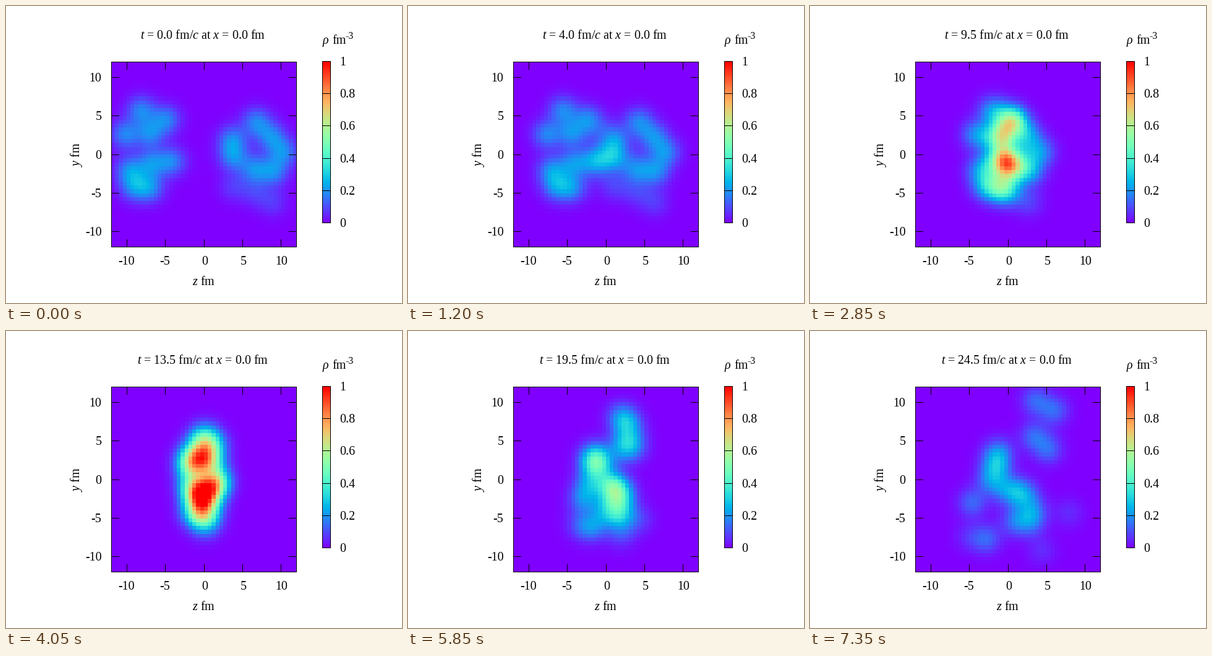
Write a matplotlib script that moves like this. It is 640 by 480 pixels and loops after 7.5 s.

```python
import numpy as np
import matplotlib as mpl
import matplotlib.pyplot as plt
from matplotlib.animation import FuncAnimation

mpl.rcParams.update({
    "font.family": "Liberation Serif",
    "mathtext.fontset": "custom",
    "mathtext.rm": "Liberation Serif",
    "mathtext.it": "Liberation Serif:italic",
})

FRAMES, STEP_MS, DT = 50, 150, 0.5
LEFT, RIGHT, TOP, BOTTOM = 170, 470, 90, 390
BAR_L, BAR_R, BAR_T, BAR_B = 511, 525, 89, 351
LIMIT, CELLS = 12, 48

SPEED = 0.64            # approach speed of each nucleus
STOPPING = 0.35         # share of the motion left after crossing z = 0
T_MAX, T_END = 13.5, 24.5
WIDTH, PEAK, LOSS, GAIN = 1.3, 0.17, 0.04, 1.2

# Start and end (z, y) of every cluster.
projectile = np.array([
    [(-8.1, 5.7), (3.6, 10.2)], [(-4.9, 4.5), (5.2, 3.9)],
    [(-7.0, 2.7), (3.4, 5.6)], [(-10.2, 2.6), (-1.2, 3.6)],
    [(-9.6, -2.0), (-4.6, -3.0)], [(-6.8, -1.2), (1.2, -1.6)],
    [(-4.2, -0.9), (2.2, -2.0)], [(-7.0, -4.3), (2.9, -5.5)],
    [(-9.0, -4.1), (-2.8, -7.7)],
])
target = np.array([
    [(6.8, 4.2), (6.0, 8.9)], [(3.7, 1.9), (-1.5, 2.4)],
    [(3.8, -0.3), (-2.3, -0.2)], [(8.7, 2.3), (-1.5, 1.2)],
    [(10.3, 0.3), (-0.3, -1.3)], [(9.0, -2.2), (3.2, -4.0)],
    [(6.5, -1.9), (0.9, -5.4)],
])
halo = np.array([
    [(3.8, -4.2), (-5.0, -7.4)], [(6.6, -4.9), (4.4, -9.2)],
    [(8.9, -6.2), (7.9, -4.3)],
])

centers = (np.arange(CELLS) + 0.5) * 2 * LIMIT / CELLS - LIMIT


def cloud(clusters, v, t):
    """Density of clusters that approach, pile up and then fly apart."""
    start, end = clusters[:, 0], clusters[:, 1]
    z = start[:, 0] + v * min(t, T_MAX)
    z = np.where(z * v > 0, STOPPING * z, z)
    u = max(0, (t - T_MAX) / (T_END - T_MAX))
    pos = (1 - u) * np.column_stack([z, start[:, 1]]) + u * end
    bell = np.exp(-(centers[:, None, None] - pos) ** 2 / (2 * WIDTH ** 2))
    return (PEAK - LOSS * u) * bell[..., 1] @ bell[..., 0].T


def density(t):
    a = cloud(projectile, SPEED, t)
    b = cloud(target, -SPEED, t) + 0.4 * cloud(halo, -SPEED, t)
    squeeze = GAIN * min(1, (T_END - t) / (T_END - T_MAX))
    return np.clip(a + b + squeeze * np.sqrt(a * b), 0, 1)


def rainbow(v):
    return np.stack([np.clip(np.abs(2 * v - 0.5), 0, 1),
                     np.clip(np.sin(np.pi * v), 0, 1),
                     np.clip(np.cos(np.pi * v / 2), 0, 1)], axis=-1)


fig = plt.figure(figsize=(6.4, 4.8), dpi=100, facecolor="white")
ax = fig.add_axes([0, 0, 1, 1])


def label(x, y, s, ha="center", size=20, **kw):
    return ax.text(x, y, s, ha=ha, va="baseline", fontsize=size * 0.72, **kw)


def line(xs, ys):
    ax.plot(xs, ys, color="black", lw=0.72, snap=False, zorder=3,
            solid_capstyle="butt", solid_joinstyle="miter")


def panel(data, l, r, t, b):
    """Image with a one pixel frame just inside its edges."""
    img = ax.imshow(data, extent=(l, r, b, t), origin="lower",
                    interpolation="nearest", aspect="auto")
    l, r, t, b = l + 0.5, r - 0.5, t + 0.5, b - 0.5
    line([l, r, r, l, l, r], [t, t, b, b, t, t])
    return img


def pixel(x):
    return np.floor(x) + 0.5


heat = panel(rainbow(density(0)), LEFT, RIGHT, TOP, BOTTOM)
panel(rainbow(np.linspace(0, 1, 128))[:, None, :], BAR_L, BAR_R, BAR_T, BAR_B)
ax.set_xlim(0, 640)
ax.set_ylim(480, 0)
ax.axis("off")

for v in range(-10, 11, 5):
    px = pixel(320 + v * (RIGHT - LEFT - 1) / 24)
    py = pixel(240 - v * (BOTTOM - TOP - 1) / 24)
    for a, b in ((TOP, TOP + 13), (BOTTOM - 13, BOTTOM)):
        line([px, px], [a, b])
    for a, b in ((LEFT, LEFT + 13), (RIGHT - 13, RIGHT)):
        line([a, b], [py, py])
    label(px + (1 if v >= 0 else -1), 418, str(v))
    label(154.5, py + 6.5, str(v), ha="right")
for v in np.linspace(0, 1, 6):
    py = pixel(BAR_B - 0.5 - v * (BAR_B - BAR_T - 1))
    line([BAR_L, BAR_R], [py, py])
    label(539, py + 6.5, f"{v:.1g}", ha="left")

label(319, 451, "$z$ fm")
label(119, 240.5, "$y$ fm", rotation=90, rotation_mode="anchor")
label(511.5, 61, "ρ", ha="left", style="italic")
label(527, 61, "fm", ha="left")
label(548.5, 53, "-3", ha="left", size=16)
title = label(318.5, 53, "")


def update(i):
    t = i * DT
    heat.set_data(rainbow(density(t)))
    title.set_text(f"$t$ = {t:.1f} fm/$c$ at $x$ = 0.0 fm")
    return heat, title


anim = FuncAnimation(fig, update, frames=FRAMES, interval=STEP_MS,
                     repeat=True, repeat_delay=0, blit=False)
plt.show()
```
